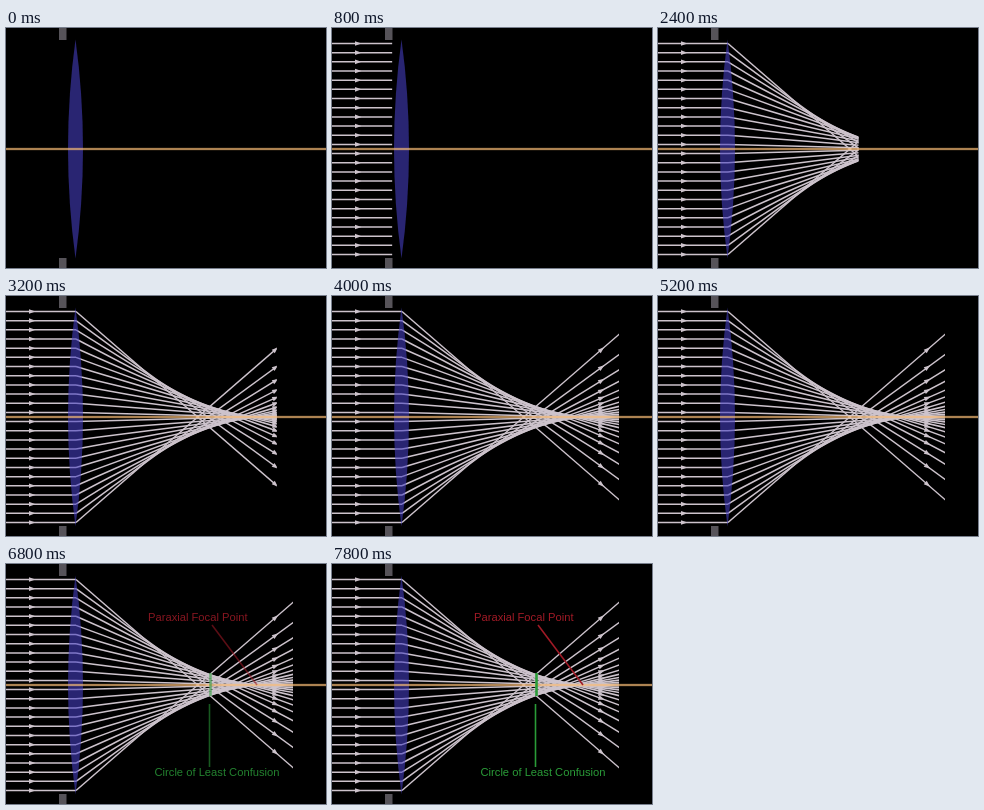
An HTML page with a canvas that plays this animation: 320x240 px, repeating every 8 s.

```html
<!DOCTYPE html>
<html lang="en">
<head>
<meta charset="utf-8">
<title>Spherical aberration</title>
<style>
html, body { margin: 0; width: 100%; height: 100%; overflow: hidden; background: #000; }
canvas { display: block; width: 100vw; height: 100vh; }
</style>
</head>
<body>
<canvas id="stage" width="320" height="240"></canvas>
<script>
const ctx = document.getElementById('stage').getContext('2d');
const LOOP = 8000, STEP = 200;
const LENS_X = 70, AXIS_Y = 121, END_X = 287;
const RAYS = 24, TOP = 15.5, GAP = 211 / 23;
const RAY = '#cdc3cc', RED = '#a01a26', GREEN = '#2a9c38';

const clamp01 = v => Math.max(0, Math.min(1, v));
const fade = (t, start, length) => clamp01((t - start) / length);

// Outer rays meet the axis closer to the lens.
const focalLength = h => 181.8 - 0.0054 * h * h;

function line(x1, y1, x2, y2, color, width) {
  ctx.strokeStyle = color;
  ctx.lineWidth = width;
  ctx.beginPath();
  ctx.moveTo(x1, y1);
  ctx.lineTo(x2, y2);
  ctx.stroke();
}

function arrow(x, y, angle) {
  ctx.save();
  ctx.translate(x, y);
  ctx.rotate(angle);
  ctx.fillStyle = RAY;
  ctx.beginPath();
  ctx.moveTo(3.5, 0);
  ctx.lineTo(-3, -2.3);
  ctx.lineTo(-3, 2.3);
  ctx.fill();
  ctx.restore();
}

function drawRays(front) {
  ctx.save();
  ctx.beginPath();
  ctx.rect(0, 0, Math.min(front, END_X), 240);
  ctx.clip();
  for (let i = 0; i < RAYS; i++) {
    const y = TOP + i * GAP;
    const h = AXIS_Y - y;
    const slope = h / focalLength(h);
    const yAt = x => y + slope * (x - LENS_X);
    line(0, y, LENS_X, y, RAY, 1.5);
    line(LENS_X, y, END_X + 2, yAt(END_X + 2), RAY, 1.5);
    arrow(26, y, 0);
    arrow(269.5, yAt(269.5), Math.atan(slope));
  }
  ctx.restore();
}

function drawLens() {
  ctx.fillStyle = 'rgba(72, 64, 196, 0.58)';
  ctx.beginPath();
  ctx.moveTo(69.5, 11.5);
  ctx.quadraticCurveTo(84.5, 121, 69.5, 230.5);
  ctx.quadraticCurveTo(54.5, 121, 69.5, 11.5);
  ctx.fill();
}

function drawStops() {
  ctx.fillStyle = '#565359';
  ctx.fillRect(53, 0, 7.5, 12);
  ctx.fillRect(53, 230, 7.5, 10);
}

// Translucent, so that the dense bundle shines through.
function drawAxis() {
  line(0, AXIS_Y, 320, AXIS_Y, 'rgba(236, 180, 112, 0.42)', 2.6);
  line(0, AXIS_Y, 320, AXIS_Y, 'rgba(250, 190, 120, 0.65)', 1.7);
}

function label(text, x, y, color) {
  ctx.fillStyle = color;
  ctx.font = '11.2px "Liberation Sans", Arial, sans-serif';
  ctx.fillText(text, x, y);
}

function drawLabels(t) {
  ctx.globalAlpha = fade(t, 5800, 1200);
  label('Paraxial Focal Point', 142, 57, RED);
  label('Circle of Least Confusion', 148.5, 212, GREEN);
  ctx.globalAlpha = fade(t, 6000, 1400);
  line(206, 61, 251, 121, RED, 1.5);
  line(203.5, 140, 203.5, 203, GREEN, 1.6);
  line(204.5, 109, 204.5, 132, GREEN, 2.6);
  ctx.globalAlpha = 1;
}

function draw(now) {
  const t = Math.floor((now % LOOP) / STEP) * STEP;
  ctx.fillStyle = '#000';
  ctx.fillRect(0, 0, 320, 240);
  const front = -10 + t * 0.0877;
  if (front > 0) drawRays(front);
  drawLens();
  drawStops();
  drawAxis();
  drawLabels(t);
}

const start = performance.now();
function tick() {
  draw(performance.now() - start);
  requestAnimationFrame(tick);
}
tick();
</script>
</body>
</html>
```
